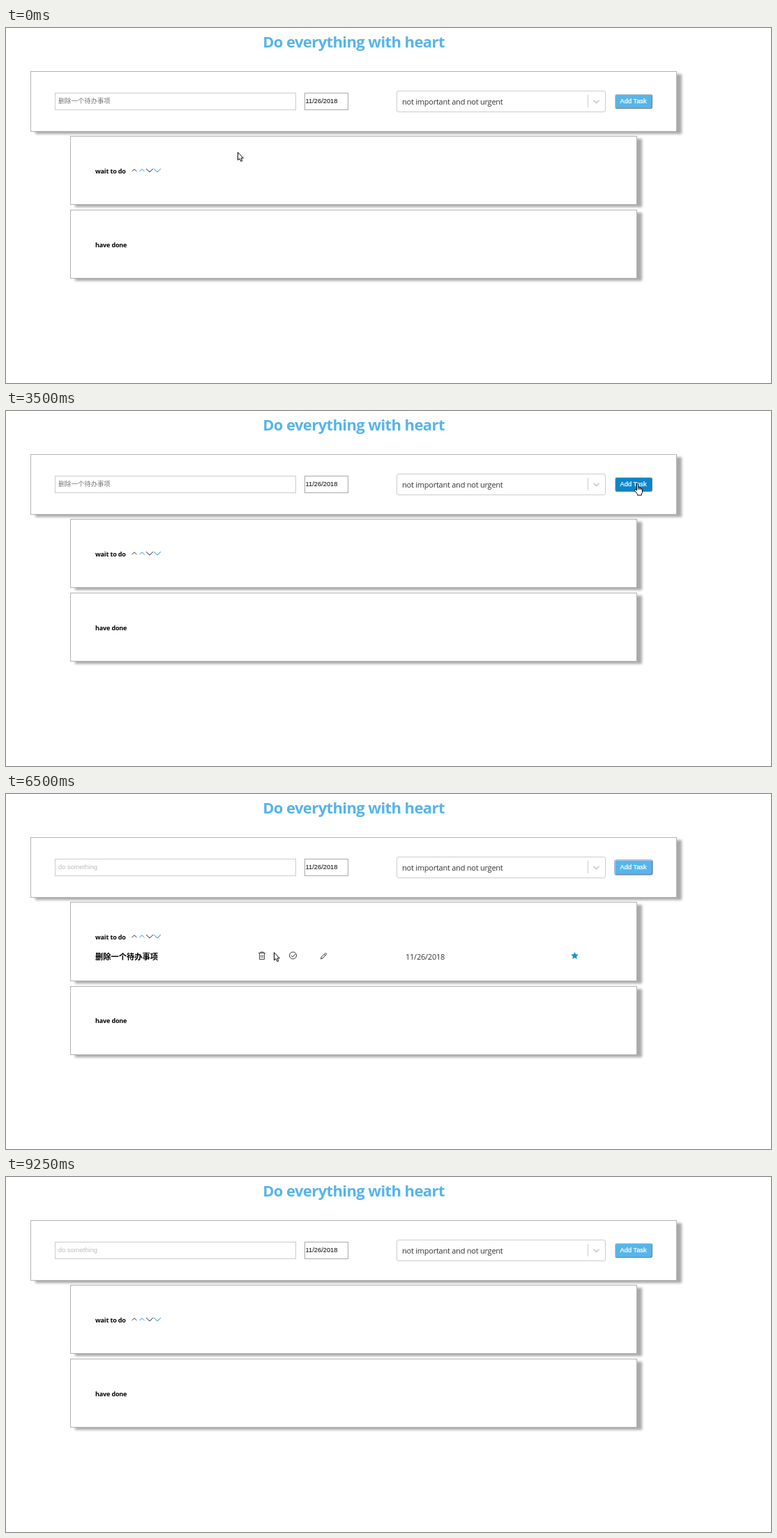
Recreate the animation shown at these times as an HTML page. Size 1097 by 510 pixels, loop 9750 ms.

```html
<!DOCTYPE html>
<html lang="en">
<head>
<meta charset="utf-8">
<title>Task list</title>
<style>
html, body { margin: 0; width: 100%; height: 100%; overflow: hidden; background: #fff; }
body { position: relative; }
div, svg { position: absolute; box-sizing: border-box; }
svg { left: 0; top: 0; width: 1097px; height: 510px; }
.card { background: #fff; border: 1px solid #b2b2b2; box-shadow: 7px 3.5px 3.5px #aaa8a8; }
#entry { left: 35px; top: 62px; width: 927px; height: 87px; }
#todo { left: 92px; top: 155px; width: 813px; height: 99px; }
#done { left: 92px; top: 261px; width: 813px; height: 99px; }
.field { top: 93px; height: 25px; border: 1px solid #ccc; }
#task { left: 70px; width: 346px; }
#date { left: 428px; width: 63px; border-color: #a9a9a9; }
#pick { left: 560px; top: 90px; width: 300px; height: 31px; border: 1px solid #ccc; border-radius: 3px; }
#add { left: 873px; top: 95px; width: 54px; height: 21px; background: #56b5ea;
  border: 1.5px solid; border-color: #c6c9cc #77797c #77797c #c6c9cc; border-radius: 3px; }
#add.hover { background: #0d85ca; }
#add.focus { border-color: #a9c6ec #7180b4 #7180b4 #a9c6ec; box-shadow: 0 0 0 1px #9db4e0; }
.ui { font: 11px "Open Sans", "Noto Sans", sans-serif; letter-spacing: -.235px; fill: #333; }
.head { font: bold 9px "Open Sans", "Noto Sans", sans-serif; letter-spacing: -.15px; }
.form { font: 9.33px "Liberation Sans", Arial, sans-serif; }
.cjk { font-family: "Noto Sans CJK SC", "Noto Sans CJK", sans-serif; }
.line { fill: none; stroke: #333; stroke-width: 1; }
</style>
</head>
<body>
<div id="entry" class="card"></div>
<div id="todo" class="card"></div>
<div id="done" class="card"></div>
<div id="task" class="field"></div>
<div id="date" class="field"></div>
<div id="pick"></div>
<div id="add"></div>

<svg viewBox="0 0 1097 510">
  <text x="498.5" y="28" text-anchor="middle" fill="#56b4e9"
    style="font:bold 22px 'Open Sans','Noto Sans',sans-serif;letter-spacing:-.6px">Do everything with heart</text>

  <text id="typed" class="form cjk" x="75" y="108.3" fill="#777">删除一个待办事项</text>
  <text id="hint" class="form" x="75" y="108" fill="#bbb">do something</text>
  <text class="form" x="429.5" y="108">11/26/2018</text>
  <text class="ui" x="568" y="110">not important and not urgent</text>
  <path class="line" style="stroke:#ccc" d="M834.5 96V114"/>
  <path class="line" style="stroke:#c4c4c4;stroke-width:1.5" d="M842.5 103.8L846.5 107.8L850.5 103.8"/>
  <text class="form" x="880.5" y="108" fill="#fff" stroke="#fff" stroke-width=".25">Add Task</text>

  <text class="head" x="128" y="208.5">wait to do</text>
  <path class="line" d="M180.5 206L184 202.8L187.5 206"/>
  <path class="line" style="stroke:#1c9ad6" d="M191.5 206L195 202.8L198.5 206"/>
  <path class="line" style="stroke:#2b2340" d="M201 202.2L206 207L211 202.2"/>
  <path class="line" style="stroke:#1c8fd6" d="M212 202.2L217 207L222 202.2"/>
  <text id="doneHead" class="head" x="128" y="314.5">have done</text>

  <g id="row">
    <text class="cjk" x="128" y="238" font-size="11.25" font-weight="700">删除一个待办事项</text>
    <path id="bin" class="line" style="stroke-width:.9"
      d="M362 228.5H372M365 228.5V227H369V228.5M363.5 229V237.5H370.5V229M365.8 231V235.5M368.2 231V235.5"/>
    <circle class="line" cx="411.5" cy="232" r="5"/>
    <path class="line" d="M408.8 232L411 234.2L414.8 230"/>
    <path class="line" d="M451.5 237L452.3 234.2L457.6 228.9Q458.4 228.2 459.2 229Q460 229.8 459.2 230.6L454 236ZM456.3 230.2L458 232"/>
    <text class="ui" x="573" y="238">11/26/2018</text>
    <path id="star" fill="#1296db"/>
  </g>

  <g id="cursor" fill="#fff" stroke="#000" stroke-linejoin="round">
    <path id="arrow" d="M.5 .7V11.8L3 9.6L4.9 13.6L6.8 12.8L5 8.9H8.3Z"/>
    <path id="hand" transform="translate(-4.5 0)" d="M3.5 1.4Q3.5 .3 4.6 .3Q5.7 .3 5.7 1.4V5.2Q7.4 4.6 7.7 6Q9.3 5.4 9.7 6.8Q11.5 6.4 11.5 8V11.5Q11.5 13 10.3 14.5V16.5H4.6V15L.7 10.2Q-.1 8.8 .9 8.2Q2 7.7 3.5 9.6ZM5.7 5.2V8.3M7.7 6V8.5M9.7 6.8V8.8"/>
  </g>
</svg>

<script>
const LOOP = 9750;
const $ = id => document.getElementById(id);
const show = (id, on) => $(id).style.display = on ? "" : "none";

// time, x, y of the pointer tip
const moves = [
  [0, 332, 178], [250, 355, 159], [500, 373, 143],
  [1250, 440, 138], [1500, 509, 128], [1750, 390, 117], [2000, 262, 126], [2250, 297, 123],
  [2500, 410, 118], [2750, 560, 112], [3000, 710, 108], [3250, 835, 106], [3500, 905.5, 104.5],
  [4750, 890, 125], [5000, 830, 165], [5250, 724, 205], [5500, 463, 208], [5750, 438, 217],
  [6000, 424, 214], [6250, 402, 221], [6500, 384, 227], [6750, 373.5, 228.5],
  [8250, 366, 206], [8500, 364, 189], [8750, 470, 290], [9000, 637, 450], [9250, -99, -99]
];

const star = [...Array(10).keys()].map(i => {
  const r = i % 2 ? 2.7 : 5.6, a = i * Math.PI / 5;
  return `${815.5 + r * Math.sin(a)} ${232.5 - r * Math.cos(a)}`;
});
$("star").setAttribute("d", `M${star.join("L")}Z`);

function draw(t) {
  const within = (a, b) => t >= a && t < b;
  const [, x, y] = moves.findLast(m => m[0] <= t);
  const onAdd = within(3500, 4750), onBin = within(6750, 7750);
  const added = t >= 4000, listed = within(4000, 7750);
  const grow = listed ? 14.5 : 0;

  $("cursor").setAttribute("transform", `translate(${x} ${y})`);
  show("hand", onAdd || onBin);
  show("arrow", !onAdd && !onBin);

  $("add").classList.toggle("hover", onAdd);
  $("add").classList.toggle("focus", listed);
  show("typed", !added);
  show("hint", added);

  show("row", listed);
  $("bin").style.stroke = onBin ? "#d4483c" : "#333";
  $("todo").style.height = 99 + grow + "px";
  $("done").style.top = 261 + grow + "px";
  $("doneHead").setAttribute("y", 314.5 + grow);
}

function tick() {
  draw(performance.now() % LOOP);
  requestAnimationFrame(tick);
}
tick();
</script>
</body>
</html>
```
